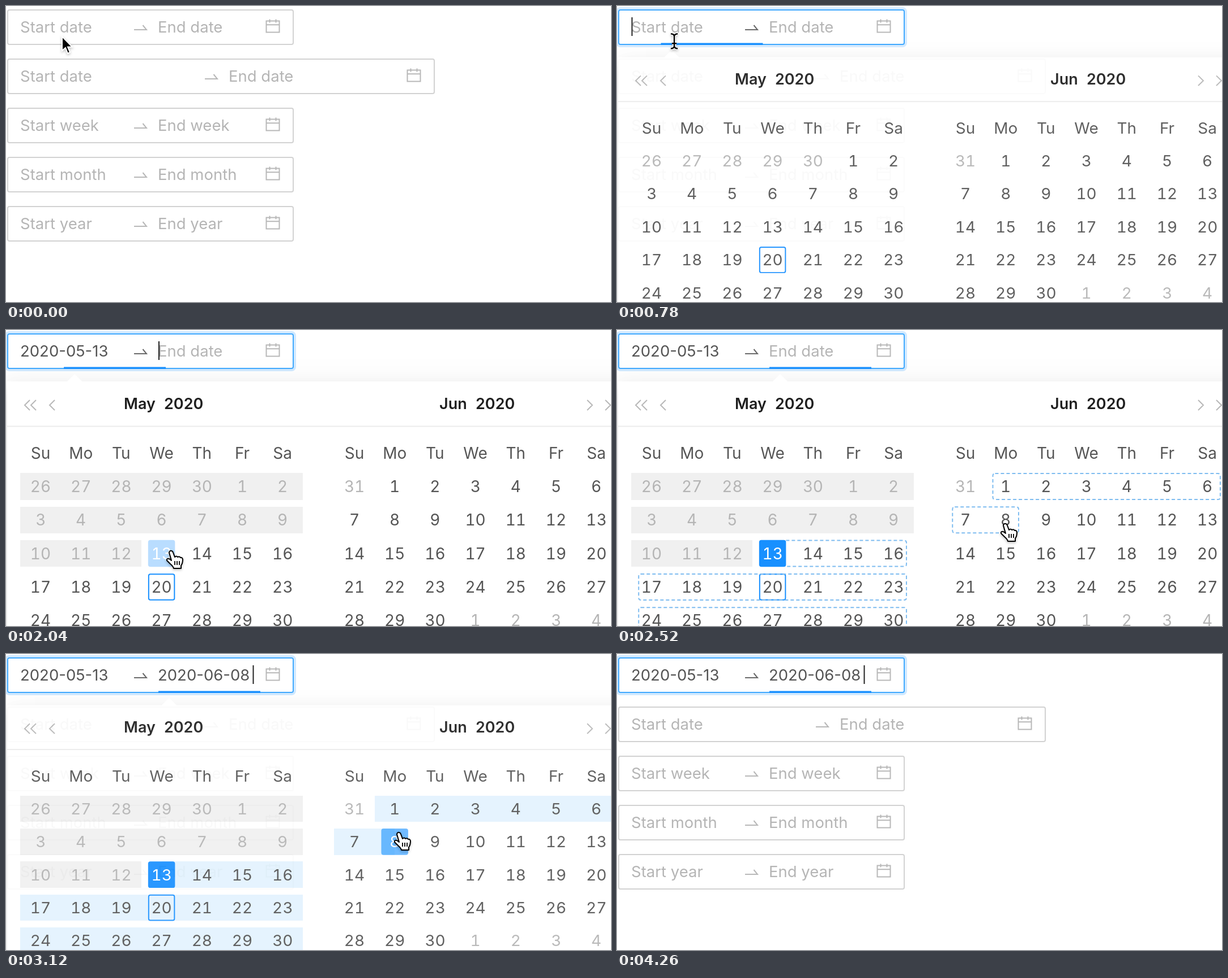
Animation of 1068x524 px, one loop 4380 ms. Source, as an HTML page:

```html
<!DOCTYPE html>
<html lang="en">
<head>
<meta charset="utf-8">
<title>Range picker</title>
<style>
  html, body { margin: 0; width: 100%; height: 100%; overflow: hidden; background: #fff; }
  #stage { position: absolute; left: 0; top: 0; width: 1068px; height: 524px; overflow: hidden; }
  svg { position: absolute; left: 0; top: 0; width: 1068px; height: 524px; overflow: visible; }
  text { font: 28px Inter, "Liberation Sans", sans-serif; }
  .hint { font-size: 27.5px; fill: #b5b5b5; }
  .value { font-size: 27.5px; fill: #555; }
  .title { font-size: 27px; font-weight: 600; fill: #1f1f1f; }
  .mid { font-size: 28px; text-anchor: middle; font-variant-numeric: tabular-nums; }
  .line { fill: none; stroke: #b8b8b8; stroke-width: 2; }
  #popup {
    position: absolute; left: 2px; top: 91px; width: 1114px; height: 640px;
    background: #fff; transform-origin: 0 -14px;
    box-shadow: 0 6px 12px -8px rgba(0,0,0,.12), 0 12px 32px rgba(0,0,0,.08),
      0 18px 56px 16px rgba(0,0,0,.05);
  }
  #popup svg { left: -2px; top: -91px; }
</style>
</head>
<body>
<div id="stage">
  <svg id="form"></svg>
  <div id="popup"><svg id="panel"></svg></div>
  <svg id="pointer"></svg>
</div>
<script>
const LOOP = 4380, FOCUS = 600, OPEN = 700, PICK_START = 1980, PICK_END = 3006;
const START_DAY = 13, END_DAY = 39, TODAY = 20;   // days counted from May 1
const COL = 71.2, ROW = 59.3, INNER = 47.5;
const MONTH_X = [61, 615], FIRST_ROW = 277;
const BLUE = '#1890ff';

const $ = id => document.getElementById(id);
const clamp = v => Math.max(0, Math.min(1, v));

function set(node, attrs) {
  for (const key in attrs) node.setAttribute(key, attrs[key]);
  return node;
}
function add(parent, tag, attrs, content) {
  const node = document.createElementNS('http://www.w3.org/2000/svg', tag);
  if (content !== undefined) node.textContent = content;
  return parent.appendChild(set(node, attrs));
}
function show(node, visible) { node.style.display = visible ? '' : 'none'; }

function bezier(x1, y1, x2, y2) {
  const at = (a, b, s) => 3 * (1 - s) ** 2 * s * a + 3 * (1 - s) * s * s * b + s ** 3;
  return x => {
    if (x <= 0) return 0;
    if (x >= 1) return 1;
    let lo = 0, hi = 1;
    for (let i = 0; i < 24; i++) {
      const s = (lo + hi) / 2;
      if (at(x1, x2, s) < x) lo = s; else hi = s;
    }
    return at(y1, y2, lo);
  };
}
const ease = bezier(.25, .1, .25, 1);
const easeOut = bezier(0, 0, .58, 1);
const easeInOut = bezier(.42, 0, .58, 1);
const quintOut = bezier(.23, 1, .32, 1);
const quintIn = bezier(.755, .05, .855, .06);

function mix(a, b, p) {
  return `rgb(${a.map((v, i) => Math.round(v + (b[i] - v) * p))})`;
}

// Form fields
const form = $('form');
const ring = add(form, 'rect', { x: 0, y: 4, width: 510, height: 67, rx: 6, fill: 'none', stroke: BLUE, 'stroke-width': 4 });

function makeField(i, unit, shift, extra) {
  const g = add(form, 'g', { transform: `translate(0 ${87 * i})` });
  return {
    box: add(g, 'rect', { class: 'line', x: 3, y: 7, width: 504 + extra, height: 61, rx: 3, style: 'stroke:#d2d2d2;fill:#fff' }),
    start: add(g, 'text', { class: 'hint', x: 25, y: 47 }, 'Start ' + unit),
    arrow: add(g, 'path', { class: 'line', d: `M${226 + shift} 42h22l-6.5 -8` }),
    end: add(g, 'text', { class: 'hint', x: 268 + shift, y: 47 }, 'End ' + unit),
    icon: add(g, 'path', { class: 'line', d: `M${459.5 + extra} 26.5h23v20h-23zm0 6.8h23M${465.5 + extra} 23.5v6m11-6v6` })
  };
}
const [field] = ['date', 'date', 'week', 'month', 'year']
  .map((unit, i) => makeField(i, unit, i === 1 ? 125 : 0, i === 1 ? 249 : 0));
const bar = add(form, 'rect', { y: 65.5, width: 180, height: 3.5, fill: BLUE });
const caret = add(form, 'rect', { y: 20, width: 2, height: 33, fill: '#222' });

// Calendar panel
const panel = $('panel');
const tip = add(panel, 'path', { fill: '#fff' });
add(panel, 'rect', { x: 2, y: 169.5, width: 1114, height: 2, fill: '#ebebeb' });
add(panel, 'path', { class: 'line', d: 'M42 124l-9 9 9 9M53 124l-9 9 9 9M86 124l-9 9 9 9M1026 124l9 9-9 9M1058 124l9 9-9 9M1069 124l9 9-9 9' });
[['May', 208, 279], ['Jun', 765, 829]].forEach(([name, x, yearX]) => {
  add(panel, 'text', { class: 'title', x, y: 140 }, name);
  add(panel, 'text', { class: 'title', x: yearX, y: 140 }, '2020');
});

const cells = [], dashes = [];
MONTH_X.forEach((left, month) => {
  ['Su', 'Mo', 'Tu', 'We', 'Th', 'Fr', 'Sa'].forEach((name, col) =>
    add(panel, 'text', { class: 'mid', fill: '#555', x: left + col * COL, y: 228 }, name));
  for (let i = 0; i < 35; i++) {
    const day = i + (month ? 31 : -4);
    const label = day < 1 ? day + 30 : day > 61 ? day - 61 : day > 31 ? day - 31 : day;
    const x = left + i % 7 * COL, y = FIRST_ROW + Math.floor(i / 7) * ROW;
    const x0 = day === START_DAY ? x : x - COL / 2;
    const x1 = day === END_DAY ? x : x + COL / 2;
    const top = y - INNER / 2;
    cells.push({
      day, month, x, y, row: Math.floor(i / 7),
      inView: month ? day > 31 && day < 62 : day > 0 && day < 32,
      back: add(panel, 'rect', { x: x0, y: top, width: x1 - x0, height: INNER, 'shape-rendering': 'crispEdges' }),
      inner: add(panel, 'rect', { x: x - INNER / 2, y: top, width: INNER, height: INNER, rx: 4 }),
      text: add(panel, 'text', { class: 'mid', x, y: y + 10 }, label)
    });
    if (day === TODAY) {
      add(panel, 'rect', { class: 'line', x: x - 22.75, y: y - 22.75, width: 45.5, height: 45.5, rx: 3, style: 'stroke:' + BLUE });
    }
  }
  for (let row = 0; row < 5; row++) {
    dashes.push({ month, row, path: add(panel, 'path', { class: 'line', style: 'stroke:#7ebcf0', 'stroke-dasharray': '6 4' }) });
  }
});

function dashPath(row) {
  if (!row.length) return '';
  const first = row[0], right = row[row.length - 1].x + 22.75;
  const top = first.y - 23, bottom = first.y + 23;
  const edge = `H${right - 4}q4 0 4 4V${bottom - 4}q0 4 -4 4`;
  if (first.day === START_DAY + 1) {
    const open = first.x - COL + INNER / 2;
    return `M${open} ${top}${edge}H${open}`;
  }
  const left = first.x - 22.75;
  return `M${left + 4} ${top}${edge}H${left + 4}q-4 0 -4 -4V${top + 4}q0 -4 4 -4`;
}

// Pointer shapes, each drawn around its hot spot
const pointer = $('pointer');
const shapes = { arrow: add(pointer, 'g'), beam: add(pointer, 'g'), hand: add(pointer, 'g') };
pointer.style.filter = 'drop-shadow(0 2px 2px rgba(0,0,0,.25))';
add(shapes.arrow, 'path', { d: 'M0 0V25L6 20L10 30L14 28L10 18.5H18Z', fill: '#000', stroke: '#fff', 'stroke-width': 2 });
[['#fff', 5], ['#000', 2.4]].forEach(([stroke, width]) =>
  add(shapes.beam, 'path', { d: 'M-6 -13Q0 -13 0 -8Q0 -13 6 -13M0 -8V8M-6 13Q0 13 0 8Q0 13 6 13M-4 4H4', fill: 'none', stroke, 'stroke-width': width }));
add(shapes.hand, 'path', {
  d: 'M-4 3Q-3 -1 0 0Q2 0 3 3L6 11Q9 8 11 11Q14 9 16 12Q19 11 20 15Q20 22 17 26V31H4Q3 27 -2 23L-8 17Q-9 13 -4 14L0 17Z',
  fill: '#fff', stroke: '#000', 'stroke-width': 2, 'stroke-linejoin': 'round'
});
add(shapes.hand, 'path', { d: 'M6 18v7m4-7v7m4-7v7', stroke: '#000', 'stroke-width': 1.8 });

const route = [
  [0, 99, 54], [720, 99, 54], [1240, 175, 356], [1260, 175, 356], [1680, 292, 391],
  [2070, 292, 391], [2460, 686, 343], [2820, 686, 343], [3060, 694, 316],
  [3480, 694, 316], [3960, 752, 530], [LOOP, 752, 530]
];
function pointerAt(t) {
  const i = route.findIndex(step => step[0] > t);
  const [t0, x0, y0] = route[i - 1], [t1, x1, y1] = route[i];
  const p = easeInOut((t - t0) / (t1 - t0));
  return { x: x0 + (x1 - x0) * p, y: y0 + (y1 - y0) * p };
}

// Caret: [from, to, x]
const caretTimes = [
  [FOCUS, 1100, 25.5], [1600, PICK_START, 25.5], [PICK_START, 2480, 269],
  [PICK_END, 3500, 435.5], [3980, LOOP, 435.5]
];

function drawForm(t, barX) {
  const focused = t >= FOCUS;
  field.box.style.stroke = mix([210, 210, 210], [64, 169, 255], ease((t - 480) / 300));
  field.arrow.style.stroke = focused ? '#6a6a6a' : '';
  ring.style.opacity = .2 * ease((t - FOCUS) / 300);
  set(bar, { x: barX });
  bar.style.opacity = clamp((t - FOCUS) / 90);
  [[field.start, t >= PICK_START, 'Start date', '2020-05-13'],
   [field.end, t >= PICK_END, 'End date', '2020-06-08']].forEach(([node, filled, hint, value]) => {
    node.textContent = filled ? value : hint;
    set(node, { class: filled ? 'value' : 'hint' });
  });
  const blink = caretTimes.find(([from, to]) => t >= from && t < to);
  show(caret, blink);
  if (blink) set(caret, { x: blink[2] });
}

function drawPanel(t, barX, mouse) {
  const leaving = t >= PICK_END;
  const shown = leaving ? 1 - quintIn((t - PICK_END) / 200) : quintOut((t - OPEN) / 200);
  const popup = $('popup');
  show(popup, shown > 0);
  if (shown <= 0) return false;
  popup.style.opacity = shown;
  popup.style.transform = `scaleY(${.8 + .2 * shown})`;
  set(tip, { d: `M${barX + 5} 92l14 -14 14 14z` });

  const hovered = cells.find(c => c.inView &&
    Math.abs(mouse.x - c.x) < COL / 2 && Math.abs(mouse.y - c.y) < ROW / 2);
  const picking = t >= PICK_START;

  for (const c of cells) {
    const disabled = picking && c.day < START_DAY && c.month === 0;
    const inRange = leaving && c.inView && c.day >= START_DAY && c.day <= END_DAY;
    const isStart = picking && c.inView && c.day === START_DAY;
    const isEnd = leaving && c.inView && c.day === END_DAY;
    set(c.back, { fill: disabled ? '#f0f0f0' : inRange ? '#e3f3fe' : 'none' });
    let fill = 'none', opacity = 1;
    if (isStart || isEnd) {
      fill = BLUE;
      opacity = ease((t - (isStart ? PICK_START : PICK_END)) / 300);
    } else if (c === hovered && t > 1300 && !picking) {
      fill = '#f5f5f5';
    }
    set(c.inner, { fill, 'fill-opacity': opacity });
    set(c.text, { fill: isStart || isEnd ? '#fff' : disabled || !c.inView ? '#b5b5b5' : '#555' });
  }

  const last = picking && !leaving && hovered ? hovered.day : 0;
  for (const d of dashes) {
    const row = cells.filter(c => c.month === d.month && c.row === d.row &&
      c.inView && c.day > START_DAY && c.day <= last);
    set(d.path, { d: dashPath(row) });
  }
  return true;
}

function render(t) {
  const mouse = pointerAt(t);
  const toStart = easeOut((t - FOCUS) / 300), toEnd = easeOut((t - PICK_START) / 300);
  const barX = 269 - 243 * (toStart - toEnd);
  drawForm(t, barX);
  const open = drawPanel(t, barX, mouse);
  const kind = t >= 240 && mouse.y < 69 ? 'beam' : open && mouse.y > 247 ? 'hand' : 'arrow';
  for (const name in shapes) show(shapes[name], name === kind);
  set(shapes[kind], { transform: `translate(${mouse.x} ${mouse.y})` });
}

const begin = performance.now();
function tick() {
  render((performance.now() - begin) % LOOP);
  requestAnimationFrame(tick);
}
tick();
</script>
</body>
</html>
```
